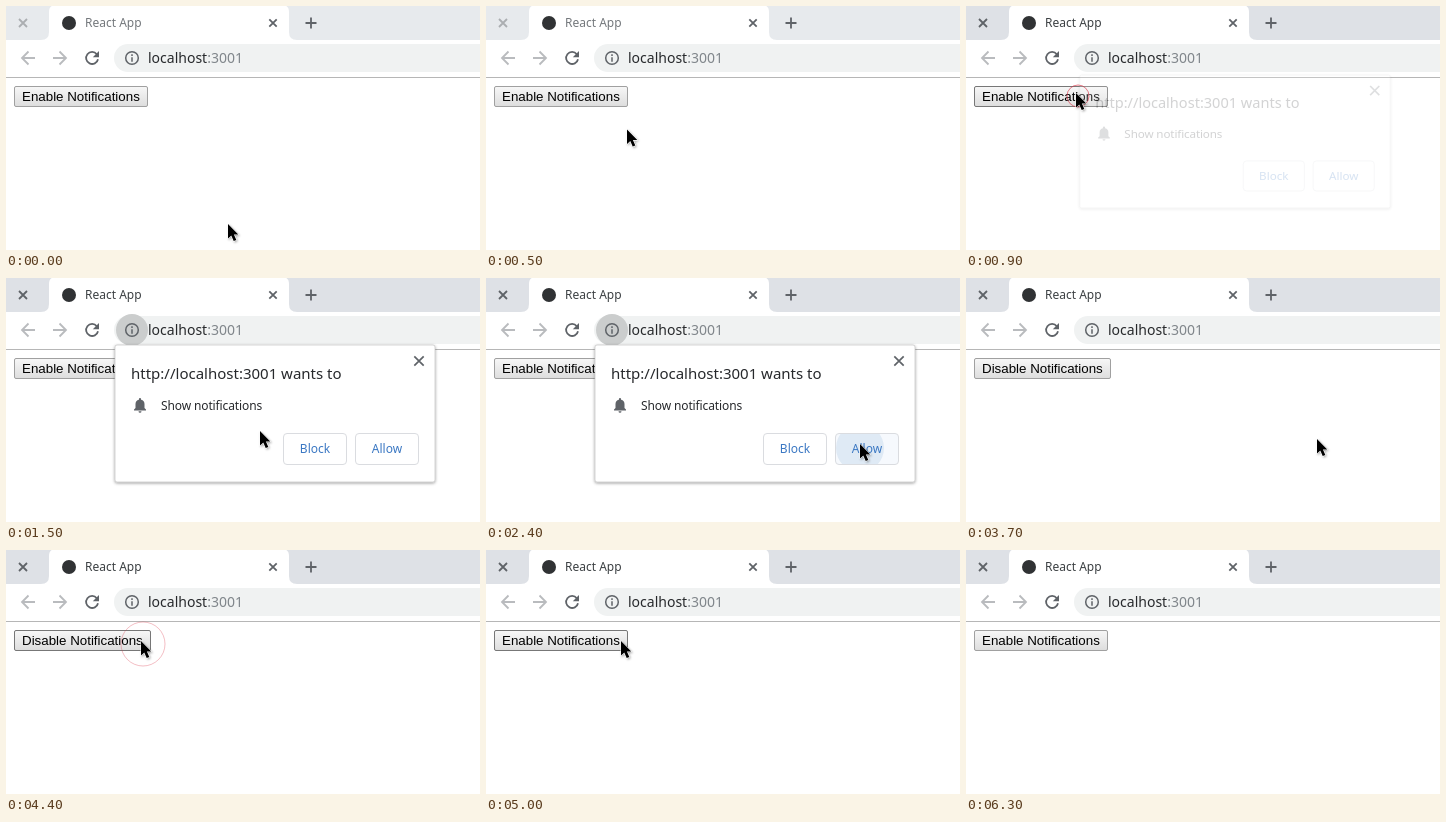
Animation, 474 px wide and 244 px high, one loop 6.6 s. Source, as an HTML page:

```html
<!DOCTYPE html>
<html lang="en">
<head>
<meta charset="utf-8">
<title>Notification permission</title>
<style>
  html, body { margin: 0; width: 100%; height: 100%; overflow: hidden; background: #fff; }
  svg { display: block; width: 474px; height: 244px; }
  text { font: 12px "Noto Sans", "Open Sans", sans-serif; fill: #3c4043; white-space: pre; }
  .line { fill: none; stroke: #5f6368; stroke-width: 1.8; }
  .off { stroke: #b9bbbe; }
  .choice { fill: #fff; stroke: #dadce0; }
  .blue { fill: #3b78c3; text-anchor: middle; }
</style>
</head>
<body>
<svg viewBox="0 0 474 244">
  <defs>
    <linearGradient id="face" x2="0" y2="1">
      <stop stop-color="#f7f7f7"/><stop offset="1" stop-color="#dddddd"/>
    </linearGradient>
    <filter id="soft" x="-20%" y="-20%" width="140%" height="150%">
      <feDropShadow dx="0" dy="1" stdDeviation="1.6" flood-opacity=".4"/>
    </filter>
    <filter id="drop" x="-50%" y="-50%" width="220%" height="220%">
      <feDropShadow dx="1" dy="1.2" stdDeviation="1" flood-opacity=".35"/>
    </filter>
    <clipPath id="allowClip"><rect x="350" y="156" width="62" height="30" rx="3"/></clipPath>
  </defs>

  <!-- tab strip -->
  <rect id="strip" width="474" height="34"/>
  <path d="M35 34Q43 34 43 26V6Q43-1 50-1H276Q283-1 283 6V26Q283 34 291 34Z" fill="#fff"/>
  <path id="sideClose" class="line" d="M13 13l8 8m0-8l-8 8"/>
  <circle cx="63" cy="17" r="7" fill="#303234"/>
  <text id="title" x="79" y="21">React App</text>
  <path class="line" stroke-width="1.6" d="M263.3 13.3l7.4 7.4m0-7.4l-7.4 7.4"/>
  <path class="line" d="M299.5 17h11m-5.5-5.5v11"/>

  <!-- toolbar -->
  <path class="line off" d="M29 52H16m6.5-6.5L16 52l6.5 6.5M47 52h13m-6.5-6.5L60 52l-6.5 6.5"/>
  <path class="line" d="M90.8 48.2A6 6 0 1 0 92 53.2"/>
  <path d="M93 45v6.2h-6.2z" fill="#5f6368"/>
  <rect x="108" y="38" width="400" height="28" rx="14" fill="#f0f2f2"/>
  <circle id="infoBack" cx="126" cy="52" r="16" fill="#cbcdcd"/>
  <circle class="line" cx="126" cy="52" r="6.3" style="stroke-width:1.5"/>
  <path class="line" d="M126 48.3v1.6m0 1.4v4.4" style="stroke-width:1.5"/>
  <text x="142" y="57" style="font-size:14px;fill:#27292c">localhost<tspan fill="#80868b">:3001</tspan></text>
  <rect y="71" width="474" height="1" fill="#b6b6b6"/>

  <!-- page -->
  <rect id="button" x="8.5" y="80.5" height="20" rx="1.5" fill="url(#face)"/>
  <text id="label" x="16" y="95" style="font:13.333px 'Liberation Sans',Arial,sans-serif;fill:#000"></text>

  <g id="dialog">
    <rect x="109" y="67" width="320" height="137" rx="2" fill="#fff" stroke="#bbb" stroke-width=".6" filter="url(#soft)"/>
    <path class="line" d="M408.3 78.3l9.4 9.4m0-9.4l-9.4 9.4" style="stroke-width:1.7"/>
    <text x="125" y="101" style="font-size:15px;fill:#27292c">http://localhost:3001 wants to</text>
    <path d="M128 132.5v-1l1.5-1.5v-4q0-3.4 3.4-4.2v-.6a1.1 1.1 0 0 1 2.2 0v.6q3.4.8 3.4 4.2v4l1.5 1.5v1zM132.5 133.3h3a1.5 1.5 0 0 1-3 0z" fill="#5f6368"/>
    <text x="155" y="132" letter-spacing="-.12" style="fill:#27292c">Show notifications</text>
    <rect class="choice" x="277.5" y="155.5" width="63" height="31" rx="3.5"/>
    <rect id="allow" class="choice" x="349.5" y="155.5" width="63" height="31" rx="3.5"/>
    <circle id="ripple" cx="374" cy="170" fill="#dfeaf5" clip-path="url(#allowClip)"/>
    <text class="blue" x="309" y="175">Block</text>
    <text class="blue" x="381" y="175">Allow</text>
  </g>

  <circle id="ring" fill="none" stroke="#d8283c"/>
  <g id="cursor" filter="url(#drop)">
    <path d="M0 0V14.5L3.3 11.4 5.7 17 8.3 15.9 5.9 10.5H10.3Z" fill="#000" stroke="#fff" stroke-width=".9" paint-order="stroke"/>
  </g>
</svg>
<script>
const LOOP = 6600, STEP = 100;
const $ = id => document.getElementById(id);
const set = (id, attrs) => {
  for (const name in attrs) $(id).setAttribute(name, attrs[name]);
};
const clamp = v => Math.max(0, Math.min(1, v));

// time, x, y of the pointer tip
const path = [
  [0, 222, 218], [200, 211, 205], [400, 166, 152], [600, 116, 95], [700, 110, 87],
  [1200, 110, 87], [1300, 135, 103], [1400, 195, 135], [1500, 254, 153],
  [1700, 345, 164], [1900, 374, 166],
  [3600, 374, 166], [3700, 351, 161], [4000, 215, 115], [4200, 135, 91],
  [5000, 135, 91], [5100, 155, 98], [5300, 256, 133], [5400, 330, 153], [5500, 375, 161]
];
const clicks = [800, 2400, 4200];

function pointer(t) {
  const i = path.findIndex(p => p[0] > t);
  if (i < 0) return path.at(-1).slice(1);
  const [t0, x0, y0] = path[i - 1], [t1, x1, y1] = path[i];
  const k = (t - t0) / (t1 - t0);
  return [x0 + (x1 - x0) * k, y0 + (y1 - y0) * k];
}

function draw(t) {
  const [x, y] = pointer(t);
  const active = t >= 800;
  set("strip", { fill: active ? "#dee1e6" : "#e7eaed" });
  $("sideClose").style.stroke = active ? "#5f6368" : "#abaeb1";
  $("title").style.fill = active ? "#3c4043" : "#74787c";

  const enabled = t >= 2800 && t < 4700;
  const width = enabled ? 136 : 133;
  const hover = t < 5600 && x >= 8 && x <= 9 + width && y >= 80 && y <= 101;
  set("button", { width, stroke: hover ? "#777" : "#a0a0a0" });
  $("label").textContent = (enabled ? "Disable" : "Enable") + " Notifications";

  // prompt fades and grows in, then reverses
  const show = t < 2000 ? clamp((t - 850) / 250) : clamp((2700 - t) / 250);
  const scale = 0.963 + 0.037 * show;
  set("dialog", {
    opacity: show,
    transform: `translate(269 135.5) scale(${scale}) translate(-269 -135.5)`
  });
  set("infoBack", { opacity: clamp((show - 0.3) / 0.7) });
  $("allow").style.fill = t >= 1900 ? "#f6f9fd" : "#fff";
  set("ripple", { r: t >= 2300 ? Math.min(60, 12 + (t - 2300) * 0.12) : 0 });

  const age = t - (clicks.findLast(c => c <= t) ?? -LOOP);
  set("ring", {
    cx: x + 2, cy: y + 3,
    r: Math.min(age, 300) * 0.11,
    opacity: age < 300 ? 0.9 - age * 0.003 : 0
  });
  set("cursor", {
    transform: `translate(${x} ${y})`,
    visibility: t < 5600 ? "visible" : "hidden"
  });
}

function tick() {
  draw(Math.floor(performance.now() % LOOP / STEP) * STEP);
  requestAnimationFrame(tick);
}
tick();
</script>
</body>
</html>
```
